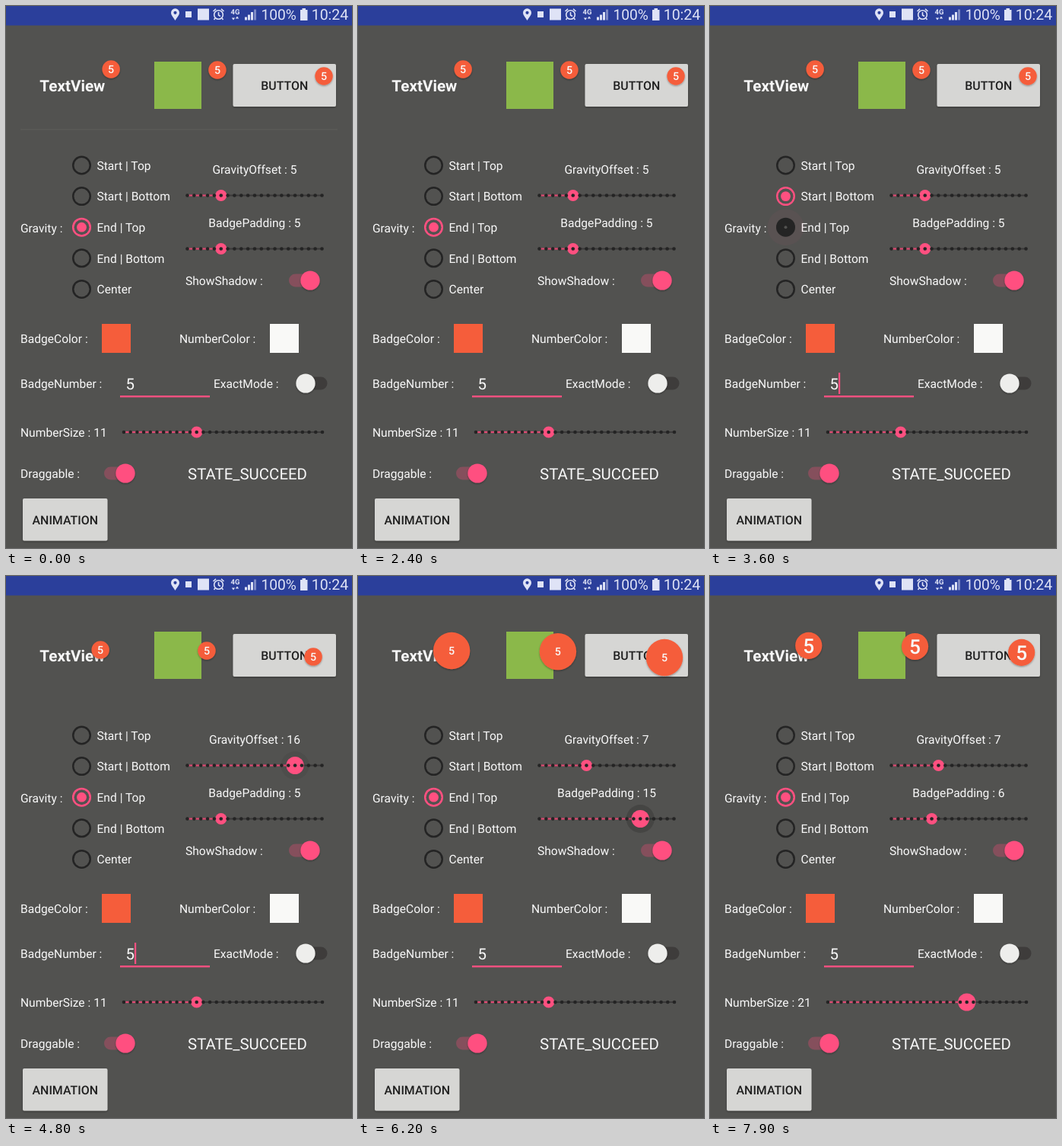
An HTML page for the animation above (8 s loop, 455x711 px).

```html
<!DOCTYPE html>
<html lang="en">
<head>
<meta charset="utf-8">
<title>Badge settings</title>
<style>
  html, body { margin: 0; width: 100%; height: 100%; overflow: hidden; background: #525250; }
  svg { display: block; width: 455px; height: 711px; }
  text {
    font-family: Roboto, "Liberation Sans", sans-serif; font-size: 15.6px; fill: #f8f8f8;
    text-rendering: geometricPrecision;
  }
</style>
</head>
<body>
<svg id="stage" viewBox="0 0 455 711" xmlns="http://www.w3.org/2000/svg">
  <defs>
    <filter id="soft" x="-30%" y="-30%" width="160%" height="170%">
      <feDropShadow dx="0" dy="1.2" stdDeviation="1.2" flood-color="#000" flood-opacity=".35"/>
    </filter>
  </defs>
</svg>
<script>
const LOOP = 8000, STEP = 100;
const PINK = '#ff5080', DARK = '#242424', ORANGE = '#f55d3b', BG = '#525250';
const stage = document.getElementById('stage');

function add(tag, attrs, parent = stage) {
  const el = document.createElementNS('http://www.w3.org/2000/svg', tag);
  parent.appendChild(el);
  return set(el, attrs);
}
function set(el, attrs) {
  for (const key in attrs) el.setAttribute(key, attrs[key]);
  return el;
}
const rect = (x, y, width, height, fill, more) => add('rect', { x, y, width, height, fill, ...more });
const circle = (cx, cy, r, fill, more) => add('circle', { cx, cy, r, fill, ...more });
const path = (d, more) => add('path', { d, fill: 'none', ...more });
function label(str, x, y, style = '', anchor = 'start') {
  const el = add('text', { x, y, style, 'text-anchor': anchor });
  el.textContent = str;
  return el;
}
const clamp = (v) => Math.max(0, Math.min(1, v));

// Status bar
function statusBar() {
  const ink = '#dfe3f6', line = { stroke: ink, 'stroke-width': 1.6 };
  rect(0, 0, 455, 25.5, '#2b3f9b');
  path('M222.5 19C220 15 217 12 217 8.8a5.5 5.5 0 0 1 11 0C228 12 225 15 222.5 19Z', { fill: ink });
  circle(222.5, 8.8, 2.1, '#2b3f9b');
  rect(236, 7, 8, 8, ink);
  rect(252, 3.5, 15, 15, ink);
  circle(279.5, 11.5, 5.8, 'none', line);
  path('M279.5 8V12L282 13.5M272.5 7L276 3.8M283 3.8L286.5 7M275 16L273.5 18M284 16L285.5 18', line);
  label('4G', 295.5, 10.5, `font-size:9.5px;font-weight:700;fill:${ink}`);
  path('M299 18.5L296.8 15.5H301.2ZM304 13.5L301.8 16.5H306.2Z', { fill: ink });
  [4, 7, 10.5, 14].forEach((h, i) => rect(314 + i * 4, 18.5 - h, 3, h, ink, { opacity: i > 2 ? .45 : 1 }));
  label('100%', 335.5, 18.2, `font-size:19.2px;fill:${ink}`);
  rect(389.5, 3, 4.5, 3, ink);
  rect(387, 5, 9.5, 14, ink);
  label('10:24', 401.7, 18.2, `font-size:19.5px;fill:${ink}`);
}

function button(str, x, y, w, h) {
  rect(x, y, w, h, '#d6d6d4', { rx: 2, filter: 'url(#soft)' });
  label(str, x + w / 2, y + h / 2 + 6.3, 'font-size:15.9px;font-weight:500;fill:#1f1f1f', 'middle');
}

function toggle(x, cy, on) {
  rect(x, cy - 8.5, 40.5, 17, on ? '#854f5c' : '#3e3c3b', { rx: 8.5 });
  circle(on ? x + 28 : x + 12, cy, 12.6, on ? PINK : '#eeeeec', { filter: 'url(#soft)' });
}

statusBar();
const rule = rect(19, 161.5, 417, 1, '#5f5e5b');
label('TextView', 44.3, 112, 'font-size:20.7px;font-weight:700');
rect(195, 73, 62, 62, '#8bb84a');
button('BUTTON', 298.5, 76, 135.5, 56);
button('ANIMATION', 22, 646, 111.5, 55.5);

label('Gravity :', 19, 296.5);
label('ShowShadow :', 236, 365.5);
label('BadgeColor :', 19, 442.3);
label('NumberColor :', 228, 442.3);
label('BadgeNumber :', 19, 501);
label('ExactMode :', 273, 501);
label('Draggable :', 19, 619);
label('STATE_SUCCEED', 317.5, 621, 'font-size:20.4px', 'middle');
rect(126, 417, 38, 38, ORANGE);
rect(347, 417, 38, 38, '#f9f9f7');
toggle(372, 360, true);
toggle(382, 495, false);
toggle(129, 613, true);

label('5', 157.5, 503, 'font-size:20.4px');
rect(150, 511, 118, 2.4, PINK);
const cursor = rect(169, 481, 2.2, 28, PINK);
const blinks = [1600, 2000, 2500, 3000, 3500, 4000, 4500, 5100, 5600, 6100, 6600, 7100, 7500, 7900];

// Gravity radios
const radios = ['Start | Top', 'Start | Bottom', 'End | Top', 'End | Bottom', 'Center'].map((name, i) => {
  const y = 209 + i * 40.6;
  label(name, 119.5, y + 5.7);
  return {
    ripple: circle(99.5, y, 24, PINK),
    disc: circle(99.5, y, 12.5, DARK),
    hole: circle(99.5, y, 10, BG),
    dot: circle(99.5, y, 6.4, PINK)
  };
});
const picks = [[-5000, 2], [2500, 0], [3000, 1], [3500, 2]];

// k runs from 0 (off) to 1 (on), passing a solid disc halfway
function drawRadio(radio, k, glow) {
  const on = k >= .5;
  set(radio.disc, { fill: on ? PINK : DARK });
  set(radio.hole, { r: on ? 10 : 10 * (1 - 2 * k) });
  set(radio.dot, { r: on ? 10 - 3.6 * (2 * k - 1) : 0 });
  set(radio.ripple, { opacity: glow });
}

function drawRadios(t) {
  const n = picks.filter(p => p[0] <= t).length - 1;
  const [since, now] = picks[n];
  const age = t - since;
  radios.forEach((radio, i) => {
    let k = 0, glow = 0;
    if (i === now) k = clamp(age / 250);
    else if (n && i === picks[n - 1][1]) k = 1 - clamp((age - 100) / 250);
    for (const [at, who] of picks) {
      if (who !== i || t < at) continue;
      const a = t - at;
      glow = .12 * Math.min(clamp(a / 300), clamp((600 - a) / 250));
    }
    drawRadio(radio, k, glow);
  });
  return now;
}

// Sliders: one value for each step of time while they are dragged
const sliders = [
  { name: 'GravityOffset', x: 327, ty: 220.3, anchor: 'middle', x0: 238.5, gap: 8.85, max: 20, y: 248.5,
    from: 4200, until: 5100, halo: .06, values: [5, 6, 8, 11, 14, 16, 16, 12, 8, 7] },
  { name: 'BadgePadding', x: 327, ty: 290, anchor: 'middle', x0: 238.5, gap: 8.85, max: 20, y: 318.5,
    from: 5600, until: 6800, halo: .16, values: [5, 6, 9, 14, 18, 18, 15, 9, 6] },
  { name: 'NumberSize', x: 19, ty: 565.2, anchor: 'start', x0: 155, gap: 8.7, max: 30, y: 559,
    from: 7500, until: 9000, halo: 0, values: [11, 13, 16, 19, 21] }
];
for (const s of sliders) {
  const w = s.gap * s.max;
  s.text = label('', s.x, s.ty, '', s.anchor);
  rect(s.x0, s.y - 1, w, 2, '#3a3939');
  s.fill = rect(s.x0, s.y - 1.1, 0, 2.2, '#e04b73');
  s.glow = circle(0, s.y, 18.5, '#000');
  s.thumb = circle(0, s.y, 7.6, PINK);
  for (let i = 0; i <= s.max; i++) circle(s.x0 + i * s.gap, s.y, 2.3, DARK);
}

function drawSlider(s, t) {
  const i = Math.floor((t - s.from) / STEP);
  const v = s.values[Math.max(0, Math.min(s.values.length - 1, i))];
  const press = Math.min(clamp((t - s.from + STEP) / 200), clamp((s.until + 300 - t) / 300));
  const x = s.x0 + v * s.gap;
  s.text.textContent = `${s.name} : ${v}`;
  set(s.fill, { width: x - s.x0 });
  set(s.thumb, { cx: x, r: 7.6 + 4 * press });
  set(s.glow, { cx: x, opacity: s.halo * press });
  return v;
}

// Badges sit inside the left, right, top and bottom edges of their views
const badges = [
  [18.6, 156.2, 64.9, 145.1],
  [155.7, 296, 66, 144.3],
  [295.8, 436.1, 73.9, 134.1]
].map(box => ({
  box,
  disc: circle(0, 0, 12, ORANGE, { filter: 'url(#soft)' }),
  num: label('5', 0, 0, 'font-weight:500', 'middle')
}));

function drawBadges(gravity, offset, padding, size) {
  const r = 11.7 + (padding - 5) * 1.25 + (size - 11) * .46;
  const inset = offset * 1.27 + r;
  const font = size * 1.2 + 1.1;
  for (const { box: [left, right, top, bottom], disc, num } of badges) {
    const cx = gravity < 2 ? left + inset : right - inset;
    const cy = gravity === 1 ? bottom - inset : top + inset;
    set(disc, { cx, cy, r });
    set(num, { x: cx, y: cy + font * .355 });
    num.style.fontSize = font + 'px';
  }
}

const start = performance.now();
function frame() {
  const elapsed = Math.max(0, performance.now() - start) % LOOP;
  const t = Math.floor(elapsed / STEP) * STEP;
  set(rule, { opacity: t < 2400 ? 1 : 0 });
  set(cursor, { opacity: blinks.filter(b => b <= t).length % 2 });
  const gravity = drawRadios(t);
  drawBadges(gravity, ...sliders.map(s => drawSlider(s, t)));
  requestAnimationFrame(frame);
}
frame();
</script>
</body>
</html>
```
